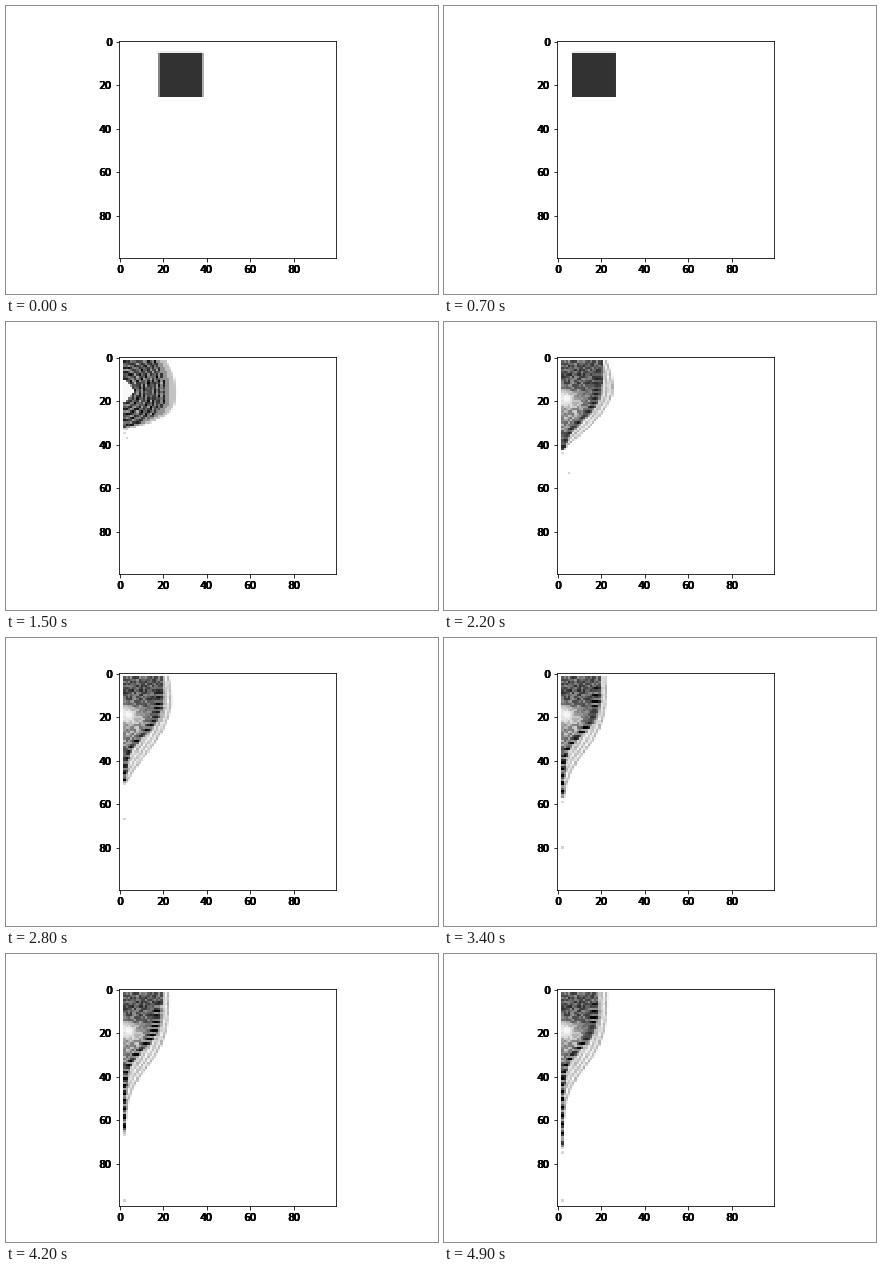
Recreate the animation shown at these times as a matplotlib script. Size 432 by 288 pixels, loop 5 s.

```python
import numpy as np
import matplotlib.pyplot as plt
from matplotlib.animation import FuncAnimation

N = 100
FRAMES = 50
IMPACT = 9
WALL = 2
MID = 16        # row where the block meets the wall head-on
INK = 0.8

rng = np.random.default_rng(7)
grain = rng.random((N, N))
cells = np.arange(N)
Y, X = np.mgrid[0:N, 0:N] + 0.5


def ramp(t, start, end):
    return float(np.clip((t - start) / (end - start), 0, 1))


def mix(a, b, w):
    return (1 - w) * a + w * b


def falloff(y, centre, width):
    """Smooth step from 1 down to 0 around centre."""
    return 1 / (1 + np.exp((y - centre) / width))


def cover(lo, hi):
    """Share of each cell lying between lo and hi."""
    return np.clip(np.minimum(cells + 1, hi) - np.maximum(cells, lo), 0, 1)


def block(t):
    left = 18.4 - 1.63 * t
    return INK * np.outer(cover(5.9, 26), cover(left, left + 20))


def tip_row(age):
    return 25.5 + 1.42 * age - 0.0055 * age ** 2


def outer_edge(age):
    """Column of the rim: a box that rounds off, then drains into a tail."""
    settle = ramp(age, 13, 25)
    reach = 23.5 - 2.5 * settle
    q = np.clip((Y - MID) / (tip_row(age) - MID), 0, 1)
    rounded = 1 - q ** (1.3 + 14 * np.exp(-age / 3.2))
    drained = falloff(Y, 36.5, 7)
    dent = 4.5 * age / 6 * np.exp(1 - age / 6)
    shoulder = dent * (np.clip(MID - Y, 0, MID) / 14) ** 2
    return WALL + 0.6 + reach * mix(rounded, drained, settle) - shoulder


def impact_tone(depth, age):
    """Faint nested arcs around a white pocket, with a pale rim."""
    radius = np.hypot(X - WALL, 0.9 * (Y - MID))
    tone = 0.5 + 0.3 * grain + 0.2 * np.sin(2 * np.pi * radius / 2.3)
    tone = np.where(depth < 5, 0.42, tone)
    tone = np.where(depth < 2.8, 0.24, tone)
    spread = ramp(age, 0, 6)
    pocket = WALL + 6 * spread * (1 - abs(Y - MID) / 6)
    return np.where(X < pocket, 0.03, mix(INK, tone, spread))


def sheet_tone(depth, age):
    """Grainy body, dense band and pale streaked fringe."""
    drift = age - 13
    band = 2.3 + (16.5 - 0.06 * drift) * falloff(Y, 29.5 - 0.07 * drift, 4)
    width = 0.9 + 1.1 * falloff(Y, 32, 5)

    body = 0.32 + 0.4 * grain + 0.12 * np.cos((Y - 8) / 6)
    hollow = np.exp(-((X - 4) / 5) ** 2 - ((Y - 19 - 0.3 * X / 2) / 4) ** 2)
    body *= 1 - 0.95 * hollow

    streaks = np.sin(2 * np.pi * depth / 2.6)
    fringe = 0.17 + 0.1 * streaks + 0.12 * (grain - 0.5)
    tone = np.where(X > band + width, fringe, body)

    # Row stripes widen toward the tip and strengthen as the band thins.
    stripes = np.sin(2 * np.pi * (20 * np.log(20 + Y) - 0.4 * age))
    contrast = mix(0.15, 0.4, ramp(age, 13, 25))
    glow = np.exp(-((X - band) / width) ** 2) * np.clip((Y - 4) / 6, 0, 1)
    return mix(tone, 0.75 + contrast * stripes, glow)


def splash(t):
    age = t - IMPACT
    tip = tip_row(age)
    depth = outer_edge(age) - X

    tone = mix(impact_tone(depth, age), sheet_tone(depth, age), ramp(age, 6, 13))
    top = mix(5.9, WALL, ramp(age, 0, 3))
    left = mix(3.8, WALL, ramp(age, 0, 2))
    tone *= np.outer(cover(top, tip), cover(left, N))
    tone *= np.clip(depth + 0.5, 0, 1)

    # Two loose droplets run ahead of the tip.
    if age >= 3:
        row = int(min(44 + 2.3 * (t - 18), 97))
        col = int(WALL + 3.5 * np.exp(-((t - 21) / 6) ** 2))
        tone[row, col] = 0.17
        tone[int(tip + 1.5), WALL] = 0.15
    return np.clip(tone, 0, 1)


def field(t):
    return block(t) if t < IMPACT else splash(t)


fig = plt.figure(figsize=(6, 4), dpi=72, facecolor="white")
ax = fig.add_axes([0.125, 0.125, 0.775, 0.755])
image = ax.imshow(field(0), cmap="binary", vmin=0, vmax=1, interpolation="nearest")
ticks = range(0, N, 20)
ax.set_xticks(ticks, labels=[])
ax.set_yticks(ticks, labels=[])


def heavy_label(text, xy, xycoords, offset, **align):
    """Overprint a label half a pixel to each side."""
    for shift in (-0.5, 0.5, -0.5, 0.5):
        ax.annotate(text, xy, xycoords=xycoords, textcoords="offset points",
                    xytext=(offset[0] + shift, offset[1]),
                    fontsize=10, family="DejaVu Sans", **align)


for value in ticks:
    heavy_label(str(value), (value, 0), ("data", "axes fraction"), (0, -7),
                ha="center", va="top")
    heavy_label(str(value), (0, value), ("axes fraction", "data"), (-7, 0),
                ha="right", va="center_baseline")


def update(frame):
    image.set_data(field(frame))
    return [image]


anim = FuncAnimation(fig, update, frames=FRAMES, interval=100,
                     repeat=True, repeat_delay=0)
plt.show()
```
